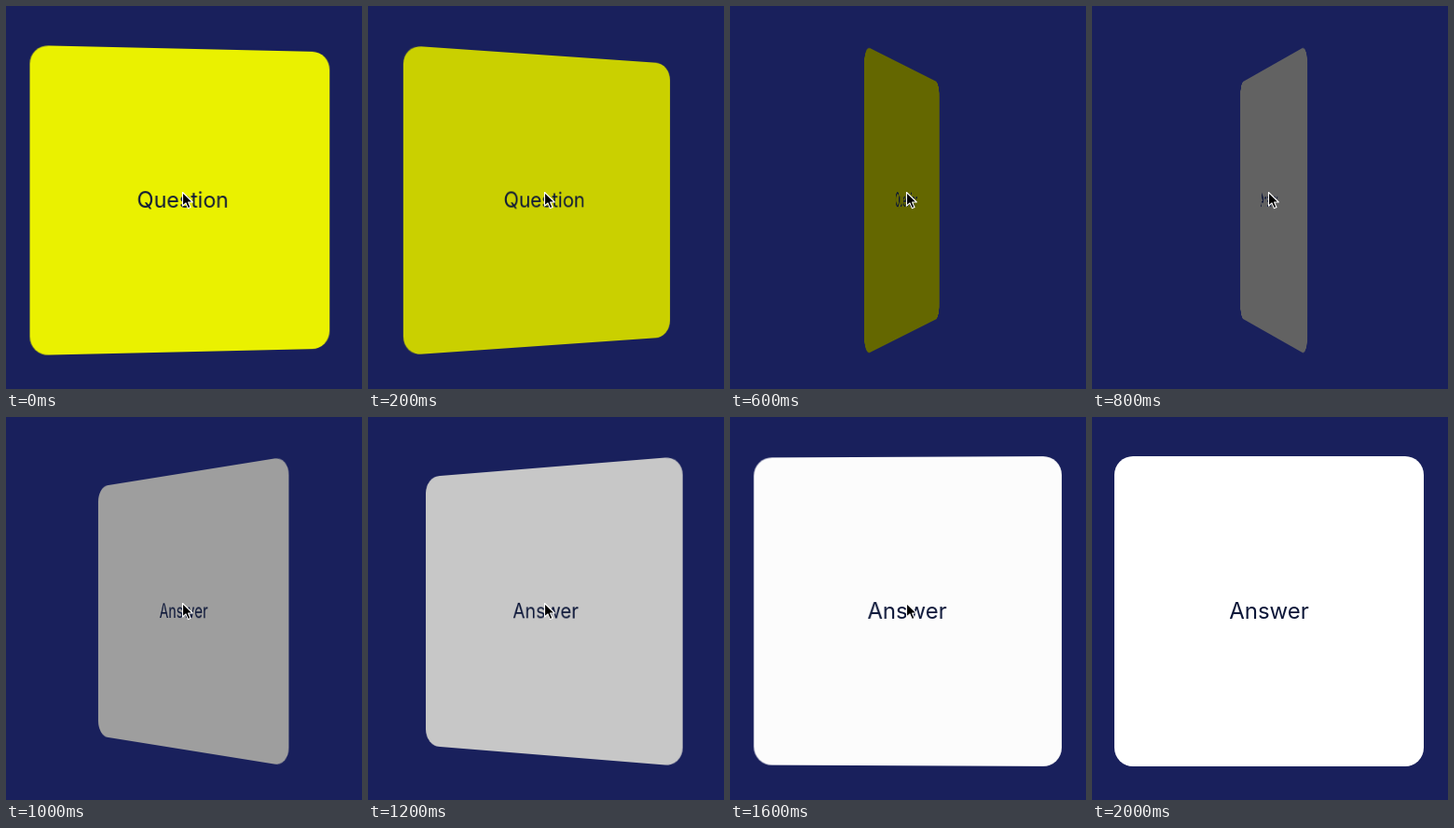
Write an HTML page that moves like this. It is 382 by 410 pixels and loops after 2600 ms.

```html
<!DOCTYPE html>
<html lang="en">
<head>
<meta charset="utf-8">
<title>Flip card</title>
<style>
  html, body { margin: 0; width: 100%; height: 100%; overflow: hidden; background: #19205c; }
  #stage { position: relative; width: 382px; height: 410px; overflow: hidden; background: #19205c; }
  #card {
    position: absolute; left: 24px; top: 42px; width: 332px; height: 332px;
    border-radius: 20px; text-align: center;
    font: 400 24px/332px Inter, Roboto, sans-serif; color: #0c1638;
  }
  #cursor { position: absolute; left: 188px; top: 198px; }
</style>
</head>
<body>
<div id="stage">
  <div id="card"></div>
  <svg id="cursor" width="15" height="21" viewBox="0 0 15 21">
    <path d="M1.5 1.5V16L5 12.9L7.4 18.6L10 17.5L7.6 12H12.3Z" fill="#000" stroke="#fff" stroke-width="1.1" stroke-linejoin="round"/>
  </svg>
</div>
<script>
const LOOP = 2600, STEP = 100, LAST_STEP = 1800, REST = 2000;
const HALF = 166, DEPTH = 985, SHADE = 0.73;
const faces = {
  question: { text: "Question", rgb: [250, 257, 0] },
  answer: { text: "Answer", rgb: [255, 255, 255] }
};
// Time in ms and progress along a sine-eased half turn.
const keys = [[0, 0.1335], [200, 0.2357], [600, 0.4428], [1000, 0.659],
              [1200, 0.746], [1600, 0.942], [1800, 0.978]];
const card = document.getElementById("card");
const cursor = document.getElementById("cursor");

function progress(t) {
  const i = Math.max(1, keys.findIndex(k => k[0] >= t));
  const [t0, p0] = keys[i - 1], [t1, p1] = keys[i];
  return p0 + (p1 - p0) * (t - t0) / (t1 - t0);
}

function draw(time) {
  const t = Math.floor((time % LOOP) / STEP) * STEP;
  const resting = t >= REST;
  const p = resting ? 1 : progress(Math.min(t, LAST_STEP));
  const turn = 90 * (1 - Math.cos(Math.PI * p));
  const face = turn < 90 ? faces.question : faces.answer;
  const angle = turn < 90 ? turn : turn - 180;

  // Pushing the card back keeps its near edge on the screen plane.
  const push = HALF * Math.sin(Math.abs(angle) * Math.PI / 180);
  const light = 1 - SHADE * Math.abs(angle) / 90;
  const rgb = face.rgb.map(c => Math.min(255, Math.round(c * light)));

  if (card.textContent !== face.text) card.textContent = face.text;
  card.style.background = `rgb(${rgb})`;
  card.style.transform = resting ? "none"
    : `perspective(${DEPTH}px) translateZ(${-push}px) rotateY(${angle}deg)`;
  cursor.style.display = resting ? "none" : "block";
}

const start = performance.now();
function tick() {
  draw(performance.now() - start);
  requestAnimationFrame(tick);
}
tick();
</script>
</body>
</html>
```
